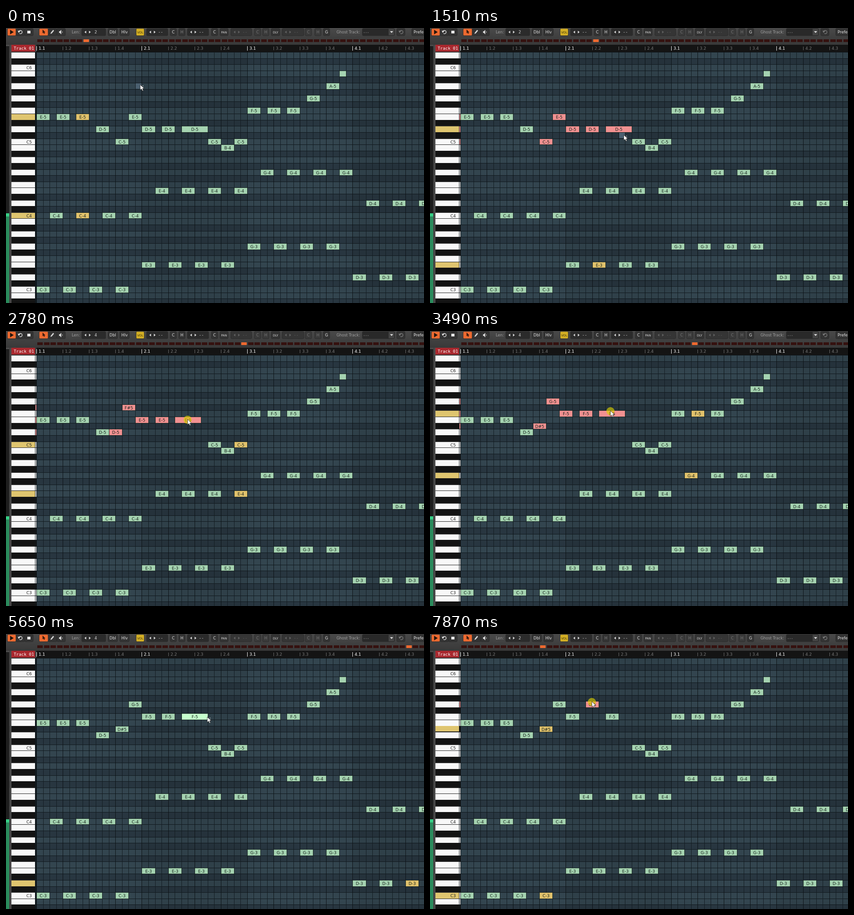
Animation of 922x607 px, one loop 8 s. Source, as an HTML page with a canvas:

```html
<!DOCTYPE html>
<html lang="en">
<head>
<meta charset="utf-8">
<title>Piano roll</title>
<style>
html, body { margin: 0; width: 100%; height: 100%; overflow: hidden; background: #3c3c3c; }
canvas { display: block; width: 922px; height: 607px; }
</style>
</head>
<body>
<canvas id="stage" width="922" height="607"></canvas>
<script>
const W = 922, H = 607, LOOP = 8000;
const c = document.getElementById('stage').getContext('2d');
const X0 = 67, CELL = 14.53, TOP = 53, ROW = 13.611, TOP_PITCH = 74;
const SANS = '"DejaVu Sans", sans-serif', MONO = '"DejaVu Sans Mono", monospace';
const NAMES = ['C-', 'C#', 'D-', 'D#', 'E-', 'F-', 'F#', 'G-', 'G#', 'A-', 'A#', 'B-'];
const GREEN = '#a5d3b1', GOLD = '#e1c26c', PINK = '#f19191', HOVER = '#c6ffcd';

const pitchOf = s => +s[2] * 12 + NAMES.indexOf(s.slice(0, 2));
const nameOf = p => NAMES[p % 12] + Math.floor(p / 12);
const isBlack = p => NAMES[p % 12][1] === '#';
const stepX = s => Math.round(X0 + s * CELL);
const rowY = p => Math.round(TOP + (TOP_PITCH - p) * ROW);

const score = {
  'E-5': [0, 3, 6], 'D-5': [9], 'C-5': [26, 30], 'B-4': [28],
  'F-5': [32, 35, 38], 'G-5': [41], 'A-5': [44],
  'C-4': [2, 6, 10, 14], 'C-3': [0, 4, 8, 12], 'E-3': [16, 20, 24, 28],
  'E-4': [18, 22, 26, 30], 'G-3': [32, 36, 40, 44], 'G-4': [34, 38, 42, 46],
  'D-3': [48, 52, 56], 'D-4': [50, 54, 58]
};
const fixed = Object.entries(score).flatMap(([name, steps]) =>
  steps.map(step => ({ step, pitch: pitchOf(name), len: 2 })));
fixed.push({ step: 46, pitch: pitchOf('B-5'), len: 1 });
const phrase = [['C-5', 12], ['E-5', 14], ['D-5', 16], ['D-5', 19], ['D-5', 22]]
  .map(([name, step]) => ({ step, pitch: pitchOf(name), len: step === 22 ? 4 : 2 }));

// Pointer path: time, x, y
const path = [
  [0, 296, 125], [380, 398, 168], [760, 303, 177], [840, 303, 177], [1220, 434, 236],
  [1700, 424, 236], [2080, 408, 227], [2230, 407, 226], [2900, 400, 192], [3350, 398, 176],
  [3600, 398, 176], [4200, 405, 176], [4500, 405, 176], [4900, 452, 212], [5400, 444, 183],
  [5850, 444, 183], [6350, 416, 183], [6820, 344, 179], [7150, 345, 181],
  [7600, 357, 149], [8000, 357, 149]
];
const presses = [[760, 1240], [2120, 4450], [4860, 4960], [5850, 6400], [7150, 8000]];

function pointer(t) {
  let i = 0;
  while (i < path.length - 2 && path[i + 1][0] <= t) i++;
  const [t0, ax, ay] = path[i], [t1, bx, by] = path[i + 1];
  const u = (t - t0) / (t1 - t0), e = u * u * (3 - 2 * u);
  return { x: ax + (bx - ax) * e, y: ay + (by - ay) * e,
           down: presses.some(([a, b]) => t >= a && t < b) };
}

function playStep(t) {
  if (t >= 3310 && t < 3560) return 35;
  return Math.floor(7 + Math.max(0, t - 10) / 113.9) % 64;
}

function notesAt(t, p) {
  let up = 0, shift = 0;
  if (t >= 2120) {
    up = t < 4200 ? Math.trunc(Math.max(0, 227 - p.y) / ROW) : 3;
    shift = t < 4200 ? Math.round((p.x - 408) / CELL) : 0;
  }
  const moved = phrase.map((n, i) => {
    const m = { ...n, step: n.step + shift, pitch: n.pitch + up };
    m.selected = t >= 1200 && t < 4900;
    if (i === 4 && t >= 5850) {
      m.len = Math.max(2, Math.min(4, Math.round((p.x - X0) / CELL) - 22));
      if (t >= 6400) m.len = 2;
      m.selected = t < 7150;
    }
    if (i === 3 && t >= 7150) {
      m.pitch += Math.trunc(Math.max(0, 181 - p.y) / ROW);
      m.selected = true;
    }
    return m;
  });
  return fixed.concat(moved);
}

function box(x, y, w, h, fill) {
  c.fillStyle = fill;
  c.fillRect(x, y, w, h);
}
function label(s, x, y, color, size = 8.8, align = 'center', font = SANS, weight = '') {
  c.font = `${weight} ${size}px ${font}`;
  c.textAlign = align;
  c.textBaseline = 'alphabetic';
  c.fillStyle = color;
  c.fillText(s, x, y);
}
function poly(points, fill) {
  c.beginPath();
  points.forEach(([x, y]) => c.lineTo(x, y));
  c.closePath();
  c.fillStyle = fill;
  c.fill();
}
function panel(x, w, fill = '#333') {
  c.beginPath();
  c.roundRect(x, 1, w, 16, 2);
  c.fillStyle = fill;
  c.fill();
  c.strokeStyle = '#2b2b2b';
  c.lineWidth = 1;
  c.stroke();
}
function button(s, x, w, color = '#e4e4e4', fill = '#333', size = 8.6, weight = '') {
  panel(x, w, fill);
  label(s, x + w / 2, 12, color, size, 'center', SANS, weight);
}
function spinner(s, x, w, on = true) {
  const ink = on ? '#d8d8d8' : '#606060';
  panel(x, w, on ? '#2b2b2b' : '#353535');
  poly([[x + 10, 6], [x + 10, 12], [x + 6, 9]], ink);
  poly([[x + 16, 6], [x + 16, 12], [x + 20, 9]], ink);
  label(s, x + 31, 12, ink, 9, 'center', MONO);
}
function cycle(x, y, color) {
  c.strokeStyle = color;
  c.lineWidth = 1.5;
  c.beginPath();
  c.arc(x, y, 3.6, -2.6, 2.2);
  c.stroke();
  poly([[x - 6, y - 3], [x, y - 3], [x - 4, y + 2]], color);
}
function arrow(x, y, k, fill, edge) {
  const shape = [[0, 0], [0, 12], [2.8, 9.4], [5, 14], [7, 13], [5, 8.8], [8.7, 8.6]];
  c.lineJoin = 'round';
  poly(shape.map(([a, b]) => [x + a * k, y + b * k]), fill);
  c.strokeStyle = edge;
  c.lineWidth = 0.8;
  c.stroke();
}

function toolbar(t) {
  const bar = c.createLinearGradient(0, 0, 0, 36);
  bar.addColorStop(0, '#494949');
  bar.addColorStop(1, '#393939');
  box(0, 0, W, 37, bar);
  [[22, 19], [41, 19], [93, 19], [112, 19], [862, 18]].forEach(([x, w]) => panel(x, w));
  panel(3, 19, '#ed6a30');
  poly([[9, 4], [9, 14], [17, 9]], '#24140c');
  cycle(32, 9, '#e0e0e0');
  box(47, 6, 7, 6, '#e8e8e8');
  panel(73, 20, '#ed6a30');
  arrow(81, 4, 0.6, '#3a1c10', '#3a1c10');
  poly([[98, 13], [99, 10], [104, 4], [106, 6], [101, 12]], '#d4d4d4');
  poly([[117, 7], [119, 7], [122, 4], [122, 14], [119, 11], [117, 11]], '#d4d4d4');
  box(124, 7, 1, 4, '#aaa');
  label('Len:', 145, 12, '#a0a0a0', 8.5, 'left');
  spinner(t >= 2190 && t < 6350 ? '4' : '2', 167, 53);
  button('Dbl', 225, 21);
  button('Hlv', 251, 21);
  button('VOL', 287, 18, '#332b08', '#d5b024', 6.5);
  spinner('--', 310, 47);
  button('C', 362, 14);
  button('H', 381, 14, t >= 1200 && t < 5900 ? '#e4e4e4' : '#858585');
  spinner('--', 400, 47);
  button('C', 453, 14);
  button('PAN', 472, 18, '#ddd', '#333', 6.5);
  spinner('--', 496, 46, false);
  button('C', 548, 14, '#777', '#3a3a3a');
  button('H', 566, 14, '#777', '#3a3a3a');
  button('DLY', 585, 19, '#ddd', '#333', 6.5);
  spinner('--', 609, 48, false);
  button('C', 660, 14, '#777', '#3a3a3a');
  button('H', 681, 14, '#777', '#3a3a3a');
  button('G', 700, 14);
  label('Ghost Track:', 729, 12, '#a0a0a0', 8.4, 'left');
  panel(786, 71, '#292929');
  label('---', 788, 12, '#ddd', 7, 'left', MONO);
  box(844, 2, 12, 14, '#444');
  poly([[847, 7], [854, 7], [850.5, 11]], '#ddd');
  cycle(872, 9, '#777');
  panel(895, 40);
  label('Prefe', 899, 12, '#e4e4e4', 8.6, 'left');
}

function ruler(step) {
  for (let s = 0; s < 60; s++)
    box(stepX(s) + 2, 25, 12, 6, s === step ? '#f0692f' : '#35110f');
  box(67, 37, W - 67, 16, '#141414');
  for (let b = 0; b < 15; b++) {
    const x = stepX(b * 4), bar = b % 4 === 0;
    box(x, bar ? 40 : 41, 1, bar ? 10 : 8, bar ? '#f2f2f2' : '#6a6a6a');
    label(`${Math.floor(b / 4) + 1}.${b % 4 + 1}`, x + 5, 48, bar ? '#fff' : '#777', 9, 'left');
  }
  box(12, 37, 52, 15, '#a9282e');
  label('Track 01', 17, 48, '#fff', 9.3, 'left', MONO);
}

function sidebar() {
  box(0, 37, 12, H - 37, '#4c4c4c');
  box(0, 40, 7, H - 40, '#1d1d1d');
  box(0, 416, 7, H - 416, '#2a8b5c');
  box(0, 409, 7, 7, '#37cf86');
  box(8, 37, 1, H - 37, '#333');
}

function roll(notes, step) {
  const live = new Set(), marked = new Set();
  notes.forEach(n => {
    if (step >= n.step && step < n.step + n.len) live.add(n.pitch);
    if (n.selected) marked.add(n.pitch);
  });
  box(12, 53, W - 12, H - 53, '#10181d');
  for (let p = TOP_PITCH; p > TOP_PITCH - 41; p--) {
    const y = rowY(p), h = rowY(p - 1) - y, black = isBlack(p);
    box(67, y + 1, W - 67, h - 1, black ? '#283640' : '#33454f');
    box(12, y, 52, h, '#242424');
    const face = live.has(p) ? '#dfc56f' : black ? '#131313' : '#f8f8f8';
    box(12, y + (black ? 0 : 1), 52, h - 1, face);
    if (marked.size)
      box(65, y + 1, 2, h - 1, marked.has(p) ? PINK : black ? '#131313' : '#f0f0f0');
    if (p % 12 === 0) label('C' + p / 12, 57, y + 11, '#222', 9, 'right');
  }
  // Every second bar is a shade darker
  for (let s = 16; s < 60; s += 32)
    box(stepX(s), 53, 16 * CELL, H - 53, 'rgba(0,0,0,.08)');
  for (let s = 0; s < 60; s++)
    box(stepX(s), 53, 1, H - 53, s % 4 ? '#131c22' : '#0c1216');
}

function drawNotes(notes, step, p) {
  const inside = n => p.x >= X0 + n.step * CELL && p.x < X0 + (n.step + n.len) * CELL &&
    p.y >= rowY(n.pitch) && p.y < rowY(n.pitch - 1);
  if (!p.down && !notes.some(inside)) {
    const s = Math.floor((p.x - X0) / CELL), q = TOP_PITCH - Math.floor((p.y - TOP) / ROW);
    box(stepX(s) + 1, rowY(q) + 1, 13, 12, '#4b6070');
  }
  notes.forEach(n => {
    const x = stepX(n.step), y = rowY(n.pitch);
    const w = stepX(n.step + n.len) - x, h = rowY(n.pitch - 1) - y;
    const live = step >= n.step && step < n.step + n.len;
    const fill = n.selected ? PINK : live ? GOLD : !p.down && inside(n) ? HOVER : GREEN;
    box(x, y, w + 1, h + 1, '#17231f');
    box(x + 1, y + 1, w - 1, h - 1, fill);
    if (n.len > 1) label(nameOf(n.pitch), x + w / 2 + 0.5, y + 11, '#14201a', 9);
  });
}

function drawPointer(p) {
  if (p.down) {
    c.beginPath();
    c.arc(p.x, p.y + 1, 9, 0, 7);
    c.fillStyle = 'rgba(222,210,0,.63)';
    c.fill();
  } else {
    box(p.x + 5, p.y + 2, 2, 1, '#ddd');
    box(p.x + 5, p.y + 5, 2, 1, '#ddd');
  }
  arrow(p.x, p.y, 1, '#fff', '#222');
}

function draw(t) {
  const p = pointer(t), step = playStep(t), notes = notesAt(t, p);
  box(0, 0, W, H, '#3c3c3c');
  toolbar(t);
  ruler(step);
  sidebar();
  roll(notes, step);
  drawNotes(notes, step, p);
  drawPointer(p);
}

const start = performance.now();
function tick() {
  draw((performance.now() - start) % LOOP);
  requestAnimationFrame(tick);
}
tick();
</script>
</body>
</html>
```
